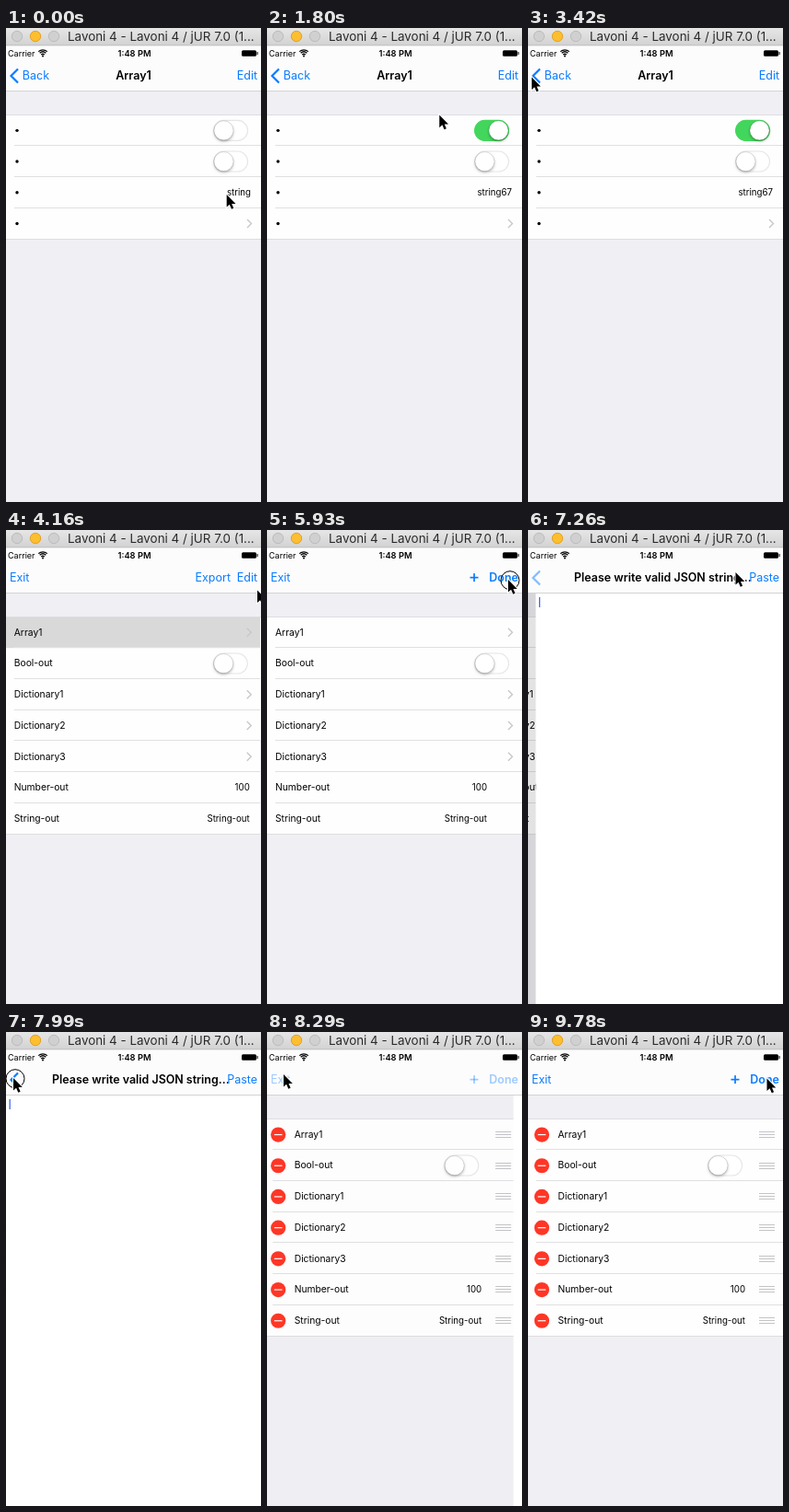
An HTML page with a canvas for the animation above (9.88 s loop, 277 by 515 pixels).

```html
<!DOCTYPE html>
<html lang="en">
<head>
<meta charset="utf-8">
<title>List editor</title>
<style>
html, body { margin: 0; width: 100%; height: 100%; overflow: hidden; }
canvas { display: block; }
</style>
</head>
<body>
<canvas id="stage" width="277" height="515"></canvas>
<script>
const ctx = document.getElementById('stage').getContext('2d');
const W = 277, H = 515, LOOP = 9880, STEP = 148;
const TOP = 94.5, ROW = 33.7, BLUE = '#0a7cff', GREY = '#c7c7cc';

// Times below are counted in steps of 148 ms.
const POP_ARRAY = 23.5, EDIT = 40, PUSH_JSON = 46, POP_JSON = 53.07;
const CLICKS = [10, 24, 40, 45, 53];
const PATH = [
  [0, 239.7, 181], [6, 239.7, 181], [9, 243, 107], [11, 243, 107], [14, 28, 59],
  [18, 262, 166], [22, 18, 59], [23, 4, 53.5], [24, 4, 53.5], [28, 273, 65.5],
  [30, 262, 56], [33, 212, 46], [35, 262, 54], [40, 262, 54], [41, 262, 54],
  [44, 225.5, 46], [49, 225.5, 46], [52, 8, 50], [54, 8, 50], [56, 18, 46],
  [60, 257, 52], [62, 260, 51], [65, 260, 51], [66, 259.5, 50.5], [67, 259.5, 50.5]
];

const clamp = v => Math.max(0, Math.min(1, v));
const ease = v => { v = clamp(v); return v * v * (3 - 2 * v); };
// Share of the way still to go in a damped spring.
const spring = e => e <= 0 ? 1 : (1 + 1.78 * e) * Math.exp(-1.78 * e);

function text(str, x, y, size, { color = '#000', weight = 400, align = 'left' } = {}) {
  ctx.font = `${weight} ${size}px Inter, sans-serif`;
  ctx.textAlign = align;
  ctx.textBaseline = 'alphabetic';
  ctx.fillStyle = color;
  ctx.fillText(str, x, y + size * 0.36);
}

function rect(x, y, w, h, color) {
  ctx.fillStyle = color;
  ctx.fillRect(x, y, w, h);
}

function line(points, color, width) {
  ctx.beginPath();
  points.forEach(([x, y]) => ctx.lineTo(x, y));
  ctx.strokeStyle = color;
  ctx.lineWidth = width;
  ctx.stroke();
}

function circle(x, y, r, fill, stroke) {
  ctx.beginPath();
  ctx.arc(x, y, r, 0, 7);
  if (fill) { ctx.fillStyle = fill; ctx.fill(); }
  if (stroke) { ctx.strokeStyle = stroke; ctx.lineWidth = 1; ctx.stroke(); }
}

function faded(alpha, draw) {
  if (alpha <= 0) return;
  ctx.save();
  ctx.globalAlpha *= alpha;
  draw();
  ctx.restore();
}

function toggle(x, y, on) {
  ctx.beginPath();
  ctx.roundRect(x + 0.6, y - 11, 37, 22, 11);
  ctx.fillStyle = '#fff';
  ctx.fill();
  faded(on, () => { ctx.fillStyle = '#43d65c'; ctx.fill(); });
  ctx.strokeStyle = on > 0.5 ? '#43d65c' : '#e6e6e6';
  ctx.lineWidth = 1.1;
  ctx.stroke();
  ctx.save();
  ctx.shadowColor = 'rgba(0,0,0,.3)';
  ctx.shadowBlur = 3;
  ctx.shadowOffsetY = 1.5;
  circle(x + 11.5 + 15 * on, y, 10.5, '#fff');
  ctx.restore();
  circle(x + 11.5 + 15 * on, y, 10.5, null, 'rgba(0,0,0,.12)');
}

const arrow = (x, y) => line([[x + 262, y - 4.5], [x + 266.5, y], [x + 262, y + 4.5]], GREY, 1.4);

function table(x, rows, { highlight = 0, editing = false, p = 0 } = {}) {
  const bottom = TOP + rows.length * ROW;
  rect(x, 68, W, H, '#efeff4');
  rect(x, TOP, W, bottom - TOP, '#fefefe');
  faded(highlight, () => rect(x, TOP, W, ROW, '#d9d9d9'));
  for (let i = 0; i <= rows.length; i++) {
    const edge = i === 0 || i === rows.length, y = TOP + i * ROW;
    if (edge) rect(x, Math.round(y - 0.5), W, 1, '#dedee1');
    else rect(x + 9, Math.floor(y - 0.5), W, 1, '#e0e0e2');
  }
  rows.forEach(([label, kind, value], i) => {
    const y = TOP + (i + 0.5) * ROW;
    if (label) text(label, x + 9 + 23.5 * p, y - 0.3, 10.3);
    else circle(x + 12, y, 1.7, '#000');
    if (kind === 'toggle') toggle(x + 225 - 30 * p, y, value);
    else if (kind === 'value') text(value, x + (label ? 265 : 266) - (editing ? 26 + 3 * p : 0), y - 0.3, 9.7, { align: 'right' });
    else faded(1 - p, () => arrow(x, y));
    faded(p, () => {
      for (const dy of [-3, 0, 3]) rect(x + 251, Math.floor(y) + dy, 17, 1, '#c4c4c8');
      const cx = x + 15 - 30 * (1 - p);
      circle(cx, y + 0.2, 8.1, '#ff3626');
      rect(cx - 4.3, y - 0.4, 8.6, 1.2, '#fff');
    });
  });
}

function arrayScreen(x, n) {
  const typed = 'string' + (n >= 4 ? '67' : n >= 2 ? '6' : '');
  table(x, [['', 'toggle', ease((n - 9) / 2)], ['', 'toggle', 0], ['', 'value', typed], ['', 'arrow']]);
}

function rootScreen(x, n) {
  table(x, [
    ['Array1', 'arrow'], ['Bool-out', 'toggle', 0],
    ['Dictionary1', 'arrow'], ['Dictionary2', 'arrow'], ['Dictionary3', 'arrow'],
    ['Number-out', 'value', '100'], ['String-out', 'value', 'String-out']
  ], {
    highlight: 1 - clamp((n - 28) / 2),
    editing: n >= EDIT,
    p: ease((n - EDIT) / 2.5)
  });
}

function jsonScreen(x, n) {
  rect(x, 68, W, H, '#fff');
  if (n < POP_JSON) rect(x + 3.5, 73, 1.3, 11, '#4169e8');
}

// The covering screen stands at the given share of the width to the right.
function stack(below, above, share, n) {
  below(-0.3 * W * (1 - share), n);
  if (share > 0.998) return;
  rect(0, 68, W, H, `rgba(0,0,0,${0.11 * (1 - share)})`);
  above(W * share, n);
}

const backMark = () => line([[13, 44.5], [5.5, 52], [13, 59.5]], BLUE, 2.2);
const item = (str, x, align, weight) => text(str, x, 51.5, 12.5, { color: BLUE, align, weight });
const BARS = {
  array: {
    left() { backMark(); item('Back', 17.8); },
    title(dx) { text('Array1', 138.5 + dx, 51.5, 12.5, { weight: 600, align: 'center' }); },
    right() { item('Edit', 273, 'right'); }
  },
  root: {
    left() { item('Exit', 4); },
    title() {},
    right() { item('Export', 244, 'right'); item('Edit', 273, 'right'); }
  },
  edit: {
    left() { item('Exit', 4); },
    title() {},
    right() {
      rect(220.5, 50.8, 9, 1.7, BLUE);
      rect(224.2, 47.1, 1.7, 9, BLUE);
      item('Done', 273, 'right', 600);
    }
  },
  json: {
    left: backMark,
    title(dx) { text('Please write valid JSON string...', 50 + dx, 51.5, 12.45, { weight: 600 }); },
    right() { item('Paste', 273, 'right'); }
  }
};

function bar(name, left = 1, right = left, dx = 0) {
  faded(left, BARS[name].left);
  faded(right, () => { BARS[name].title(dx); BARS[name].right(); });
}

function navigation(n) {
  rect(0, 19, W, 49, '#fcfcfd');
  rect(0, 68, W, 1, '#d3d3d6');
  if (n < POP_ARRAY || n >= EDIT && n < PUSH_JSON) return bar(n < EDIT ? 'array' : 'edit');
  if (n < EDIT) {
    const e = n - POP_ARRAY, out = 1 - e / 2;
    bar('array', out, out, 110 * (1 - spring(e)));
    bar('root', clamp((e - 1.5) / 2.5));
  } else if (n < POP_JSON) {
    const e = n - PUSH_JSON;
    bar('edit', 1 - e / 2);
    bar('json', clamp((e - 2) / 2), clamp(e / 2.5), 110 * Math.max(0, spring(e) - 0.03));
  } else {
    const e = n - POP_JSON, out = 1 - e / 2;
    bar('json', out, out, 110 * (1 - spring(e)));
    bar('edit', clamp((e - 2) / 2.4));
  }
}

function chrome() {
  const shade = ctx.createLinearGradient(0, 0, 0, 19);
  shade.addColorStop(0, '#e6e6e6');
  shade.addColorStop(1, '#d2d2d2');
  rect(0, 0, W, 19, shade);
  rect(0, 18.5, W, 0.8, '#b9b9b9');
  circle(12, 9, 5.7, '#d0d0d0', '#bcbcbc');
  circle(32, 9, 5.7, '#fdbe2f', '#e0a32b');
  circle(52, 9, 5.7, '#d0d0d0', '#bcbcbc');
  text('Lavoni 4 - Lavoni 4 / jUR 7.0 (1...', 67, 9.5, 13.4, { color: '#2a2a2a' });

  text('Carrier', 2, 28, 9);
  for (const r of [2.6, 5, 7.2]) {
    ctx.beginPath();
    ctx.arc(40, 31, r, -2.3, -0.84);
    ctx.strokeStyle = '#000';
    ctx.lineWidth = 1.3;
    ctx.stroke();
  }
  circle(40, 30.6, 1, '#000');
  text('1:48 PM', 139.5, 28, 9.3, { weight: 600, align: 'center' });
  ctx.beginPath();
  ctx.roundRect(256, 24.3, 16, 6.4, 1.5);
  ctx.fillStyle = '#000';
  ctx.fill();
  rect(272.6, 26, 1, 3, '#000');
}

function pointer(n) {
  const i = Math.max(1, PATH.findIndex(k => k[0] >= n));
  const [n0, x0, y0] = PATH[i - 1], [n1, x1, y1] = PATH[i];
  const p = ease((n - n0) / (n1 - n0));
  const x = x0 + (x1 - x0) * p, y = y0 + (y1 - y0) * p;
  if (CLICKS.includes(n)) circle(x + 2, y + 0.7, 10, null, '#000');
  ctx.save();
  ctx.translate(x, y);
  ctx.beginPath();
  [[0, 0], [0, 13.6], [3.1, 10.8], [5.3, 15.8], [7.6, 14.8], [5.5, 9.9], [9.8, 9.9]]
    .forEach(([px, py]) => ctx.lineTo(px, py));
  ctx.closePath();
  ctx.strokeStyle = '#fff';
  ctx.lineWidth = 2;
  ctx.stroke();
  ctx.fillStyle = '#000';
  ctx.fill();
  ctx.restore();
}

function render(time) {
  const n = Math.floor(time % LOOP / STEP);
  ctx.clearRect(0, 0, W, H);
  if (n < EDIT) stack(rootScreen, arrayScreen, 1 - spring(n - POP_ARRAY), n);
  else if (n < POP_JSON) stack(rootScreen, jsonScreen, spring(n - PUSH_JSON), n);
  else stack(rootScreen, jsonScreen, 1 - spring(n - POP_JSON), n);
  navigation(n);
  chrome();
  pointer(n);
}

const start = performance.now();
function tick() {
  render(performance.now() - start);
  requestAnimationFrame(tick);
}
tick();
</script>
</body>
</html>
```
